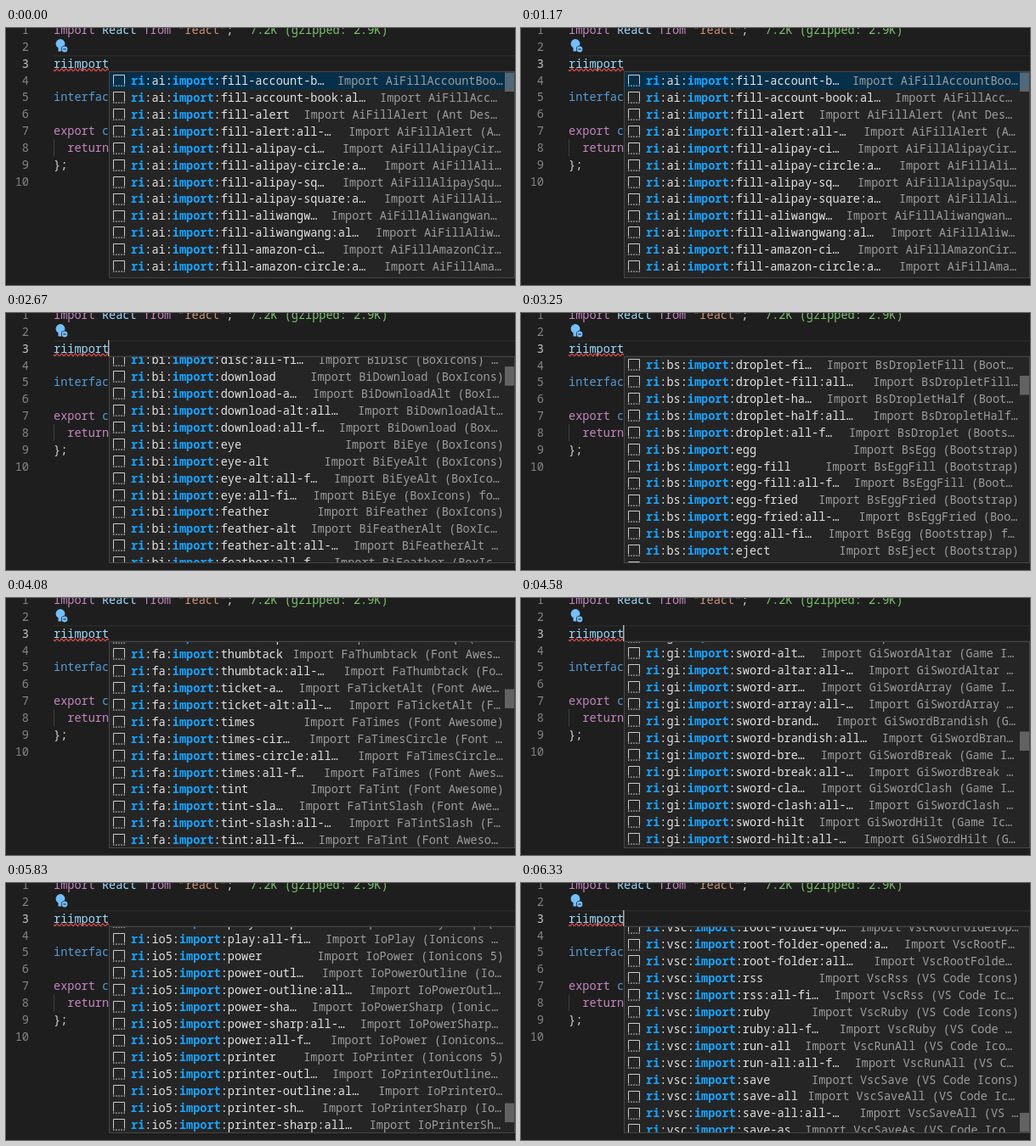
An HTML page with a canvas for the animation above (6.41 s loop, 599 by 303 pixels).

```html
<!DOCTYPE html>
<html lang="en">
<head>
<meta charset="utf-8">
<title>Icon import suggestions</title>
<style>
  html, body { margin: 0; width: 100%; height: 100%; overflow: hidden; background: #1e1e1e; }
  canvas { display: block; }
</style>
</head>
<body>
<canvas id="stage" width="599" height="303"></canvas>
<script>
const ctx = document.getElementById('stage').getContext('2d');
const LOOP = 6410, FPS = 12;
const SIZE = 13.55, CW = SIZE * 0.6, PITCH = 19.9;
const FAMILY = '"Noto Sans Mono", "DejaVu Sans Mono", monospace';
const LIST = { x: 121, y: 51, right: 599, bottom: 294, first: 62.3, text: 147 };

const split = s => s.split(' ');
const cross = (a, b) => a.flatMap(x => b.map(y => x + y));

const common = split('anchor archive award bag bell book bookmark box briefcase brush bug check clock cloud code compass cpu database disc download eye feather file film flag folder gift globe grid hash heart home image inbox key layers link lock mail map menu mic moon music package pause phone pin play power printer radio rocket search server settings shield star sun table tag target terminal trash truck umbrella unlock upload user video watch wifi zap');
const tools = split('angular bootstrap css3 debian django docker git go haskell html5 java javascript jenkins linux mongodb nodejs perl php postgresql python react ruby rust sass scala swift ubuntu vim webpack');
const quests = cross(
  split('battle broken crossed dragon fire holy iron magic moon shadow stone wolf'),
  split('-axe -bow -crown -gauntlet -helm -horn -key -mask -ring -shield -skull -tower'));
const weather = split('alien cloud day-cloudy day-fog day-rain day-snow dust fog hail humidity moon-full night-clear night-rain rain');
const each = k => common.filter((w, i) => i % k === 0);
const withEnds = ends => cross(common, split(ends).map(e => e === '.' ? '' : '-' + e));

// id, title, icon names; two-letter sets rank before longer ones
const sets = [
  ['ai', 'Ant Design', [
    ...cross(['fill-', 'outline-'], common),
    ...cross(['fill-'], split('account-book alert alipay-circle alipay-square aliwangwang amazon-circle amazon-square')),
    ...cross(['outline-'], split('bulb calculator calendar camera car caret-down caret-left caret-right caret-up'))]],
  ['bi', 'BoxIcons', withEnds('. alt')],
  ['bs', 'Bootstrap', [...withEnds('. fill'),
    ...split('droplet droplet-fill droplet-half egg egg-fill egg-fried eject eject-fill')]],
  ['cg', 'css.gg', common],
  ['di', 'Devicons', tools],
  ['fa', 'Font Awesome', [...withEnds('. alt'),
    ...split('thumbs-up thumbtack ticket-alt times times-circle tint tint-slash toggle-off')]],
  ['fc', 'Flat Color Icons', each(2)],
  ['fi', 'Feather', each(2)],
  ['gi', 'Game Icons', [...quests, ...split('sword-altar sword-array sword-brandish sword-break sword-clash sword-hilt sword-in-stone sword-mold sword-slice sword-smithing sword-spade sword-spin sword-tie sword-wound')]],
  ['go', 'Github Octicons', each(3)],
  ['gr', 'Grommet-Icons', each(2)],
  ['hi', 'Heroicons', each(2)],
  ['im', 'IcoMoon Free', each(2)],
  ['io', 'Ionicons 4', cross(['ios-'], common)],
  ['md', 'Material Design', withEnds('. outline')],
  ['ri', 'Remix Icon', withEnds('fill line')],
  ['si', 'Simple Icons', tools],
  ['ti', 'Typicons', each(3)],
  ['wi', 'Weather Icons', [...weather, ...split('refresh refresh-alt sandstorm showers sleet small-craft-advisory smog smoke snow sprinkle stars storm-warning sunrise sunset thermometer tornado windy')]],
  ['io5', 'Ionicons 5', withEnds('. outline sharp')],
  ['vsc', 'VS Code Icons', [...common, ...split('root-folder root-folder-opened rss ruby run-all save save-all save-as')]],
];

const pascal = s => s.split('-').map(w => w[0].toUpperCase() + w.slice(1)).join('');
const byCode = (a, b) => a < b ? -1 : a > b ? 1 : 0;
const clip = (s, len) => s.length <= len ? s : s.slice(0, len - 1) + '…';

const rows = sets.flatMap(([id, title, names]) =>
  cross(names, ['', ':all-files']).sort(byCode).map(tail => {
    const [name, all] = tail.split(':');
    const prefix = pascal(id.replace(/\d/, ''));
    const info = `Import ${prefix}${pascal(name)} (${title})${all ? ' for all files' : ''}`;
    return layout({ id, tail, info, all, n: name.length, wide: title.length >= 13 });
  }));

// Label and detail share one line; both shrink, the detail faster. Units are characters.
function layout(r) {
  const label = `ri:${r.id}:import:${r.tail}`;
  const room = 53.99, gap = 1.84, len = label.length;
  const over = len + r.info.length - 51.9;
  let box = len, cut = false;
  if (r.all) {
    const m = r.n + (r.wide ? 0.6 : 0);
    const shown = Math.max(0, 7.97 - 0.19 * m - 0.006 * m * m);
    box = Math.min(len, len - 9 + shown);
    cut = true;
  } else if (over > 2.5) {
    box = len - 0.13 * over;
    cut = len - box > 0.45;
  }
  r.label = cut ? clip(label, Math.floor(box)) : label;
  if (!r.all && over <= 0) {
    r.at = room - r.info.length;
  } else {
    r.at = box + gap + (r.all || over <= 2.5 ? 0.2 : 0);
    r.info = clip(r.info, Math.floor(room - r.at));
  }
  return r;
}

// step, thumb offset, set, top icon, its centre
const keys = [
  [15, 0, 'ai', 'fill-account-book', LIST.first],
  [25, 4, 'ai', 'outline-bulb:all-files', 56.2],
  [39, 21.5, 'bs', 'droplet-fill', 61.3],
  [49, 55, 'fa', 'thumbtack', 66.4],
  [55, 105, 'gi', 'sword-altar', 65.4],
  [65, 191, 'wi', 'refresh-alt', 64.4],
  [76, 218.5, 'vsc', 'root-folder-opened', 52.6],
].map(([step, thumb, id, tail, y]) => ({
  step, thumb,
  row: rows.findIndex(r => r.id === id && r.tail === tail) + (LIST.first - y) / PITCH,
}));

// Monotone cubic through the keys
function along(field, step) {
  const last = keys.length - 1;
  if (step <= keys[0].step) return keys[0][field];
  if (step >= keys[last].step) return keys[last][field];
  const i = keys.findIndex(k => k.step > step) - 1;
  const slope = j => (keys[j + 1][field] - keys[j][field]) / (keys[j + 1].step - keys[j].step);
  const tangent = j => {
    if (j === 0) return 0;
    if (j === last) return slope(j - 1) * 0.5;
    const a = slope(j - 1), b = slope(j);
    return a * b > 0 ? 2 * a * b / (a + b) : 0;
  };
  const a = keys[i], b = keys[i + 1], h = b.step - a.step, u = (step - a.step) / h;
  const v = u * u * (3 - 2 * u);
  return a[field] + (b[field] - a[field]) * v
    + h * (tangent(i) * u * (1 - u) * (1 - u) - tangent(i + 1) * u * u * (1 - u));
}

function text(s, x, mid, color, bold) {
  ctx.font = `${bold ? 'bold ' : ''}${SIZE}px ${FAMILY}`;
  ctx.fillStyle = color;
  ctx.fillText(s, x, mid + 4.8);
}

function rect(x, y, w, h, color) {
  ctx.fillStyle = color;
  ctx.fillRect(x, y, w, h);
}

function disc(x, y, r, color) {
  ctx.fillStyle = color;
  ctx.beginPath();
  ctx.arc(x, y, r, 0, Math.PI * 2);
  ctx.fill();
}

function bulb() {
  const blue = '#75beff';
  disc(64, 18.5, 5.4, blue);
  rect(61.5, 22, 4, 5.5, blue);
  disc(69, 25, 4.2, '#1e1e1e');
  disc(69, 25, 3.4, blue);
  rect(67.3, 24.5, 3.4, 1, '#1e1e1e');
}

function editor(step) {
  const mid = n => 2 + PITCH * (n - 1);
  const put = (n, col, s, color) => text(s, 56 + col * CW, mid(n), color);
  rect(0, 0, 599, 303, '#1e1e1e');
  rect(56, 32, 543, 1.5, '#282828');
  rect(56, 50, 543, 1.5, '#282828');
  for (let n = 1; n <= 10; n++)
    text(String(n), 27 - String(n).length * CW, mid(n), n === 3 ? '#c6c6c6' : '#858585');

  const purple = '#c586c0', blue = '#569cd6', plain = '#d4d4d4';
  put(1, 0, 'import', purple);
  put(1, 7, 'React', '#9cdcfe');
  put(1, 13, 'from', purple);
  put(1, 18, '"react"', '#ce9178');
  put(1, 25, ';', plain);
  text('7.2K (gzipped: 2.9K)', 287, mid(1), '#7cc36e');
  put(3, 0, 'riimport', '#9cdcfe');
  put(5, 0, 'interface', blue);
  put(7, 0, 'export', purple);
  put(7, 7, 'const', blue);
  put(8, 2, 'return', purple);
  put(9, 0, '};', plain);
  rect(56, mid(8) - 10, 1, PITCH, '#404040');
  bulb();

  ctx.strokeStyle = '#f14c4c';
  ctx.lineWidth = 1.1;
  ctx.beginPath();
  for (let x = 56; x <= 121; x += 0.5) ctx.lineTo(x, 49.3 + 1.3 * Math.sin((x - 56) * Math.PI / 2.7));
  ctx.stroke();

  const phase = (step / FPS) % 1;
  if (phase > 0.29 && phase < 0.79) rect(120, 32, 1.5, 19, '#aeafad');
}

function snippetIcon(mid) {
  const x = 126.5, y = Math.round(mid) - 6.5;
  ctx.strokeStyle = '#cccccc';
  ctx.lineWidth = 1;
  ctx.beginPath();
  ctx.moveTo(x, y + 11);
  ctx.lineTo(x, y);
  ctx.lineTo(x + 13, y);
  ctx.lineTo(x + 13, y + 11);
  ctx.stroke();
  for (let i = 0; i < 5; i++) rect(x - 0.5 + i * 3.1, y + 12, 1.5, 1.2, '#cccccc');
}

function row(r, mid) {
  const head = 4 + r.id.length;
  const put = (from, to, color, bold) =>
    text(r.label.slice(from, to), LIST.text + from * CW, mid, color, bold);
  snippetIcon(mid);
  put(0, 2, '#18a3ff', true);
  put(2, head, '#e2e2e2');
  put(head, head + 6, '#18a3ff', true);
  put(head + 6, undefined, '#e2e2e2');
  text(r.info, LIST.text + r.at * CW, mid, '#9d9d9d');
}

function suggestions(step) {
  const { x, y, right, bottom } = LIST;
  rect(x, y, right - x, bottom - y + 1, '#454545');
  rect(x + 1, y + 1, right - x - 2, bottom - y - 1, '#252526');
  ctx.save();
  ctx.beginPath();
  ctx.rect(x + 1, y + 1, right - x - 2, bottom - y - 1);
  ctx.clip();

  const top = along('row', step);
  for (let i = Math.max(0, Math.floor(top) - 1); i < top + 13 && i < rows.length; i++) {
    const mid = LIST.first + (i - top) * PITCH;
    if (i === 0) rect(x + 1, mid - PITCH / 2, right - x - 2, PITCH, '#062f4a');
    row(rows[i], mid);
  }
  rect(587, 52.5 + along('thumb', step), 11, 22.5, 'rgba(191,191,191,0.4)');
  ctx.restore();
}

function draw(now) {
  const t = now % LOOP;
  const step = Math.min(76, Math.floor(t * FPS / 1000 + 0.05));
  editor(step);
  suggestions(step);
  requestAnimationFrame(draw);
}

draw(0);
</script>
</body>
</html>
```
